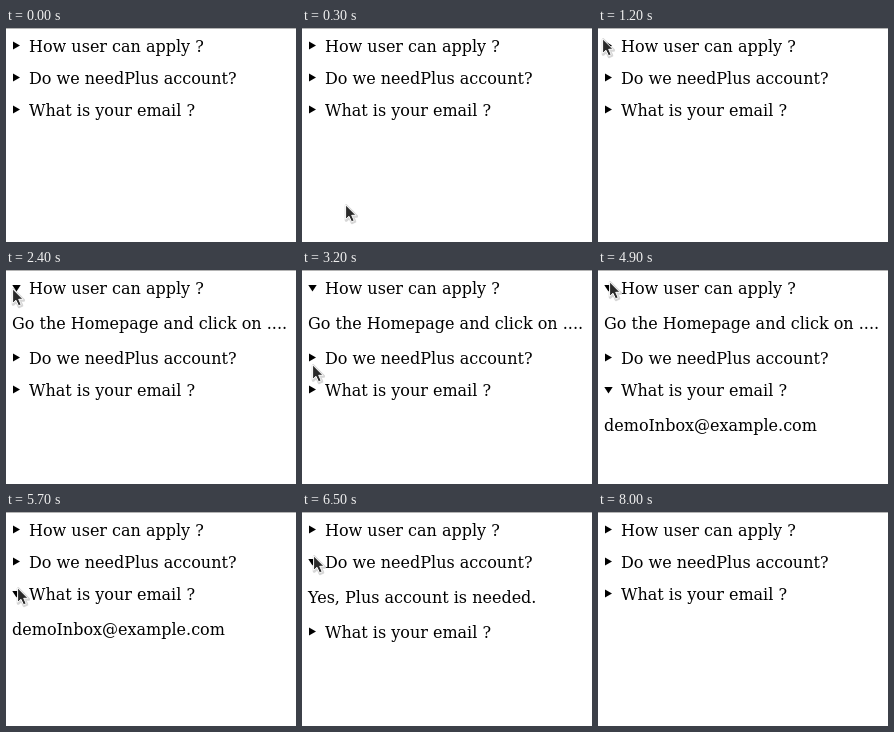
Recreate the animation shown at these times as an HTML page. Size 290 by 214 pixels, loop 10000 ms.

```html
<!DOCTYPE html>
<html lang="en">
<head>
<meta charset="utf-8">
<title>Questions</title>
<style>
  html, body { margin: 0; width: 100%; height: 100%; overflow: hidden; background: #fff; }
  #stage { position: relative; width: 290px; height: 214px; overflow: hidden; background: #fff;
    font: 16px/19px "DejaVu Serif", "Noto Serif", serif; color: #000; }
  #stage::before { content: ""; position: absolute; left: 0; top: 0; width: 100%; height: 1px; background: #b4b4b4; }
  .item { position: absolute; left: 0; top: 0; white-space: pre; }
  .item span { position: absolute; left: 23px; top: 0; }
  .item p { position: absolute; left: 6px; top: 35px; margin: 0; }
  svg { position: absolute; left: 0; top: 0; overflow: visible; }
</style>
</head>
<body>
<div id="stage"></div>
<script>
const LOOP = 10000, STEP = 100, SHOW = 200, HIDE = 8000;
const TOP = 9, ROW = 32, ANSWER = 38;
const CLOSED = "M7 4.6L14 8.5L7 12.4Z";
const OPEN = "M6.3 6H14.7L10.5 12.6Z";

const faq = [
  { q: "How user can apply ?", a: "Go the Homepage and click on ...." },
  { q: "Do we needPlus account?", a: "Yes, Plus account is needed." },
  { q: "What is your email ?", a: "demoInbox@example.com" }
];

// The pointer glides to a point, or to the marker of a row, and may click there
const START = [66, 204];
const stops = [
  { leave: 200, arrive: 300, point: [43, 176] },
  { leave: 300, arrive: 1000, point: [4, 10] },
  { leave: 1300, arrive: 2200, point: [6, 18], row: 0, click: 2200 },
  { leave: 2700, arrive: 3400, row: 2, click: 3800 },
  { leave: 3800, arrive: 4000, point: [21, 180] },
  { leave: 4000, arrive: 4800, row: 0, click: 5200 },
  { leave: 5200, arrive: 5400, row: 2, click: 6000 },
  { leave: 6000, arrive: 6200, row: 1, click: 6500 },
  { leave: 6500, arrive: 6500, row: 1, click: 7400 }
];

const isOpen = (row, t) => stops.filter(s => s.row === row && s.click <= t).length % 2 === 1;

function rowTop(row, t) {
  let y = TOP + row * ROW;
  for (let i = 0; i < row; i++) if (isOpen(i, t)) y += ANSWER;
  return y;
}

const smooth = p => p * p * (3 - 2 * p);

function pointerAt(t) {
  let [x, y] = START;
  for (const { leave, arrive, row, point } of stops) {
    if (t <= leave) break;
    const [toX, toY] = point || [11, rowTop(row, leave) + 2];
    const p = smooth(Math.min(1, (t - leave) / (arrive - leave)));
    x += (toX - x) * p;
    y += (toY - y) * p;
  }
  return [Math.round(x), Math.round(y)];
}

const stage = document.getElementById("stage");

function add(html) {
  stage.insertAdjacentHTML("beforeend", html);
  return stage.lastElementChild;
}

for (const f of faq) {
  f.el = add(`<div class="item"><svg width="20" height="19"><path/></svg><span>${f.q}</span><p>${f.a}</p></div>`);
  f.mark = f.el.querySelector("path");
  f.answer = f.el.querySelector("p");
}

const arrow = "M.6 .8V15.4L4 12.3L6.5 17.8L9.2 16.6L6.7 11.3H11Z";
const pointer = add(`<svg width="14" height="20">
  <path d="${arrow}" transform="translate(.6 .9)" fill="none" stroke="#000" stroke-opacity=".16" stroke-width="3" stroke-linejoin="round"/>
  <path d="${arrow}" fill="#2a2a2a" stroke="#fff" stroke-linejoin="round"/></svg>`);

function draw(t) {
  faq.forEach((f, i) => {
    const open = isOpen(i, t);
    f.el.style.top = rowTop(i, t) + "px";
    f.mark.setAttribute("d", open ? OPEN : CLOSED);
    f.answer.style.display = open ? "block" : "none";
  });
  const [x, y] = pointerAt(t);
  pointer.style.display = t >= SHOW && t < HIDE ? "block" : "none";
  pointer.style.left = x + "px";
  pointer.style.top = y + "px";
}

const begin = performance.now();
function tick() {
  const t = (performance.now() - begin) % LOOP;
  draw(Math.floor(t / STEP) * STEP);
  requestAnimationFrame(tick);
}
tick();
</script>
</body>
</html>
```
